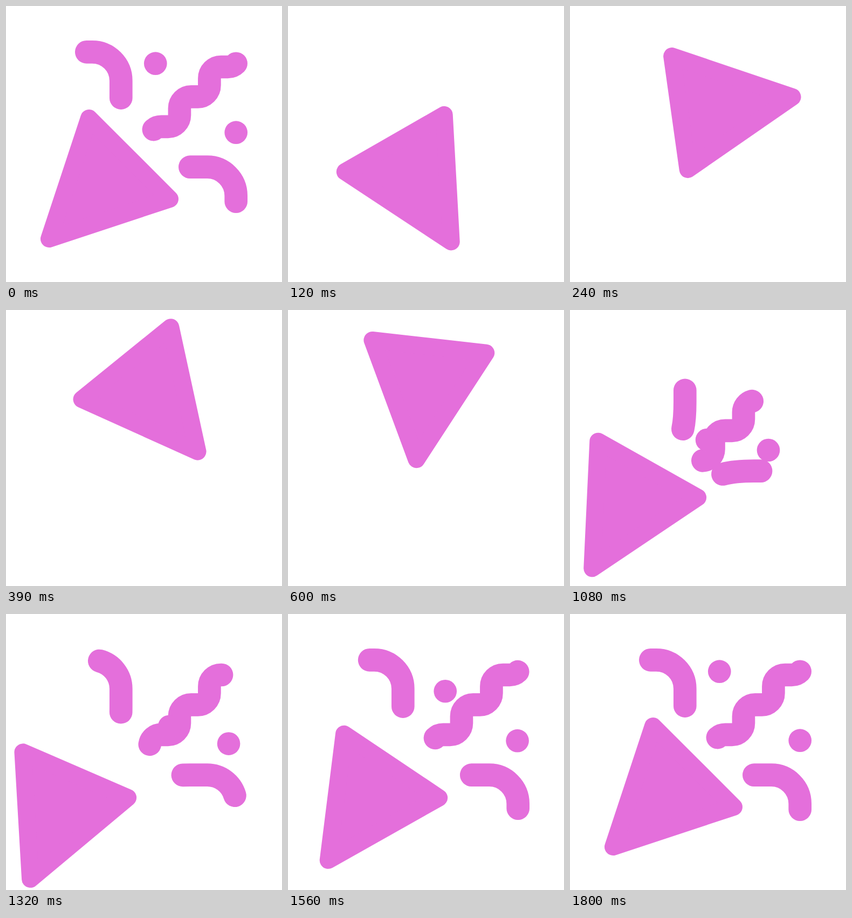
These frames come from a looping animation (512 px wide and 512 px high, 2830 ms). An HTML page:

```html
<!DOCTYPE html>
<html lang="en">
<head>
<meta charset="utf-8">
<title>Party popper</title>
<style>
  html, body { margin: 0; height: 100%; overflow: hidden; background: #fff; }
  svg { display: block; width: 100%; height: 100%; }
  #confetti path { fill: none; stroke: #e46fdb; stroke-width: 42.67; stroke-linecap: round; }
  circle, #cone { fill: #e46fdb; }
  #cone { stroke: #e46fdb; stroke-width: 32; stroke-linejoin: round; }
</style>
</head>
<body>
<svg viewBox="0 0 512 512">
  <g id="confetti">
    <path id="upper"/>
    <path id="lower" transform="matrix(0 -1 -1 0 512 512)"/>
    <path id="squiggle"/>
    <circle id="dotTop" r="21.33"/>
    <circle id="dotRight" r="21.33"/>
  </g>
  <path id="cone" d="M-112 112L-38 -112L112 38Z"/>
</svg>
<script>
const STEP = 30, LOOP = 2830, LAST = 60, BURST = 30;
const el = id => document.getElementById(id);

// Both streamers share one curve; the lower one is mirrored.
const streamer = 'M180 285C212 240 213.3 205 213.3 170.7V138.7A53.3 53.3 0 0 0 160 85.3H149.3';
el('upper').setAttribute('d', streamer);
el('lower').setAttribute('d', streamer);

const stair = 'h12.8a21.33 21.33 0 0 0 21.33-21.33v-12.8a21.33 21.33 0 0 1 21.33-21.33';
el('squiggle').setAttribute('d',
  'M176.9 334.8' + stair.repeat(4) + 'h12.8a21.33 21.33 0 0 0 15.08-6.25');

// Keys are [step, value]; monotone cubic interpolation, flat at turning points.
function track(keys) {
  const slope = i => (keys[i + 1][1] - keys[i][1]) / (keys[i + 1][0] - keys[i][0]);
  const tangent = i => {
    if (i === 0 || i === keys.length - 1) return 0;
    const a = slope(i - 1), b = slope(i);
    return a * b > 0 ? 2 * a * b / (a + b) : 0;
  };
  return f => {
    let i = 0;
    while (i < keys.length - 2 && f > keys[i + 1][0]) i++;
    const [f0, v0] = keys[i], [f1, v1] = keys[i + 1];
    const d = f1 - f0, u = (f - f0) / d, w = 1 - u;
    return v0 * w * w * (1 + 2 * u) + v1 * u * u * (3 - 2 * u)
      + d * u * w * (w * tangent(i) - u * tangent(i + 1));
  };
}

const coneX = track([[0, 192], [8, 255.7], [20, 256], [29, 217.8], [36, 119], [44, 108], [54, 175], [60, 192]]);
const coneY = track([[0, 320], [3, 313], [8, 190.8], [11, 157], [14, 132], [17, 113], [18, 112],
  [20, 119.8], [29, 290.6], [36, 341.3], [44, 346.5], [54, 322], [60, 320]]);
const coneTurn = track([[0, 0], [2, -26], [5, -98], [8, -143], [11, -112], [14, -72], [17, -50],
  [20, -38.6], [29, 1.5], [36, -15.6], [44, -21.6], [54, -8], [60, 0]]);

// Shows the last `length` units of a path, each end held back by its own lag.
function trim(id, length, tailLag, headLag) {
  const path = el(id), total = path.getTotalLength();
  const tail = Math.max(0, total - length - tailLag);
  const head = Math.max(tail, total - headLag);
  path.setAttribute('stroke-dasharray', `${head - tail} 2000`);
  path.setAttribute('stroke-dashoffset', -tail);
}

function place(id, x, y) {
  el(id).setAttribute('cx', x);
  el(id).setAttribute('cy', y);
}

function bezier(a, b, c, d, u) {
  const w = 1 - u;
  return a * w ** 3 + 3 * b * w * w * u + 3 * c * w * u * u + d * u ** 3;
}

function draw(f) {
  el('cone').setAttribute('transform', `translate(${coneX(f)} ${coneY(f)}) rotate(${coneTurn(f)})`);

  const resting = f === 0;
  el('confetti').style.display = resting || f > BURST ? '' : 'none';
  const p = resting ? LAST : Math.max(f, BURST);
  const lag = ((LAST - p) / 24) ** 3.6;
  trim('upper', 126.5, 50.4 * lag, 104.8 * lag);
  trim('lower', 126.5, 58.5 * lag, 113.8 * lag);
  trim('squiggle', 230.8, 63 * lag, 129.2 * lag);
  place('dotRight', 426.7 - 58.7 * lag, 234.7 + 25.3 * lag);
  const u = 1 - ((LAST - p) / (LAST - BURST)) ** 2;
  place('dotTop', bezier(190, 230.3, 359.5, 277.3, u), bezier(305, 184.6, 299, 106.7, u));
}

function tick() {
  draw(Math.min(LAST, Math.floor(performance.now() % LOOP / STEP)));
  requestAnimationFrame(tick);
}
tick();
</script>
</body>
</html>
```
